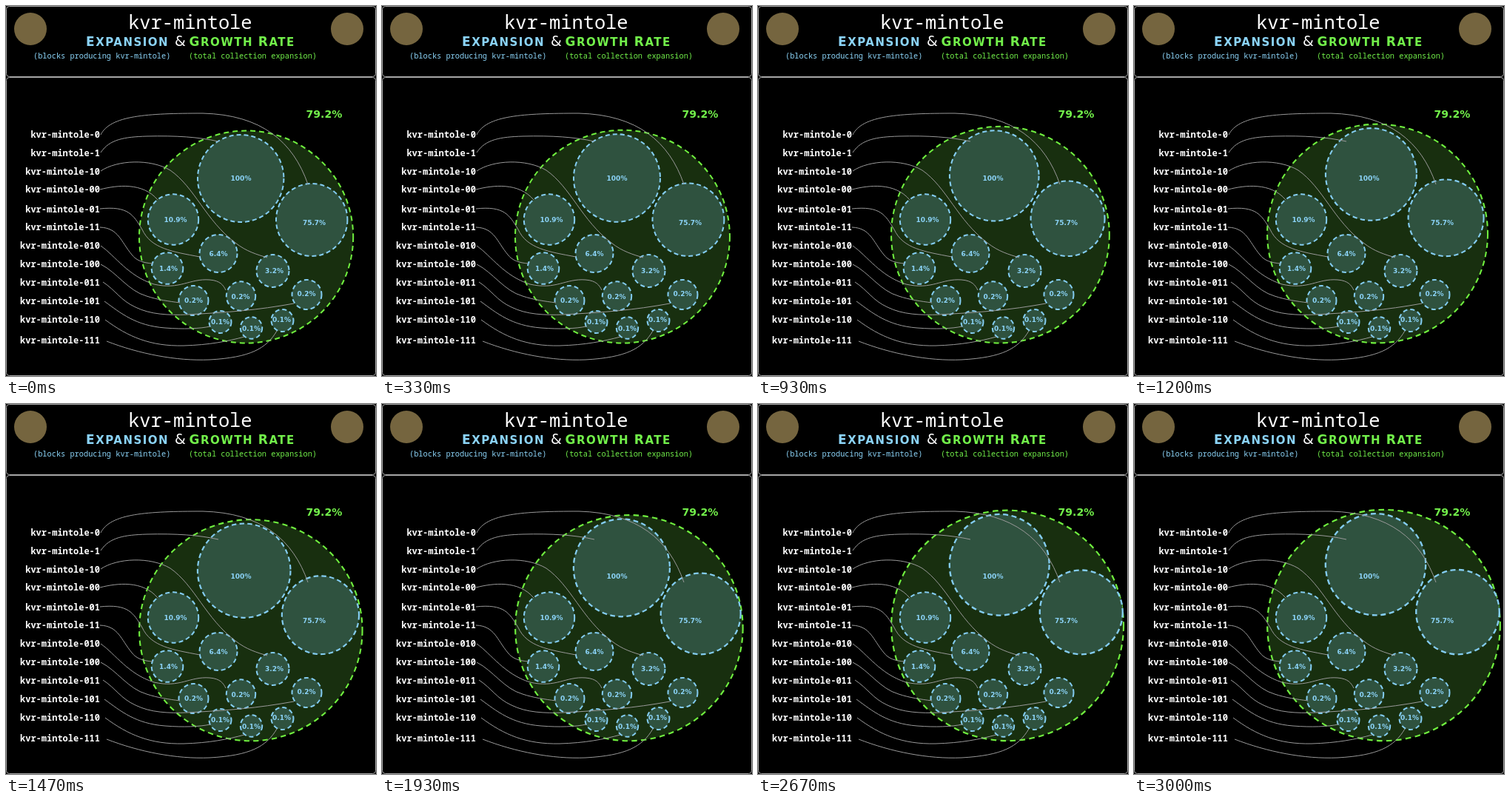
These frames come from a looping animation (500 by 500 pixels, 4.73 s). An HTML page:

```html
<!DOCTYPE html>
<html lang="en">
<head>
<meta charset="utf-8">
<title>Expansion &amp; Growth Rate</title>
<style>
  html, body { margin: 0; width: 100%; height: 100%; overflow: hidden; background: #000; }
  svg { display: block; width: 100%; height: 100%; }
  text { font-family: "Noto Sans Mono", monospace; fill: #fff; white-space: pre; }
  .panel { fill: #000; stroke: #a6a6a6; }
  .title { font-size: 25.4px; }
  .heading { font: 700 15px "DejaVu Sans", sans-serif; letter-spacing: 1.5px; }
  .heading .cap { font-size: 17px; }
  .ampersand { font: 19px "DejaVu Sans", sans-serif; }
  .note { font-size: 10.3px; }
  .label { font-size: 12px; font-weight: 600; text-anchor: end; }
  .percent { font: 700 9px "DejaVu Sans", sans-serif; text-anchor: middle; }
  .total { font: 700 14.1px "DejaVu Sans", sans-serif; }
  text.blue { fill: #8bd3f7; }
  text.green { fill: #72f04a; }
  .whole { fill: #182f0f; stroke: #70f03f; stroke-width: 2; stroke-dasharray: 7 5; }
  .bubble { fill: #2f523f; stroke: #84cdf2; stroke-width: 2; stroke-dasharray: 6 4; }
  .link { fill: none; stroke: #999; }
</style>
</head>
<body>
<svg id="stage" viewBox="0 0 500 500">
  <rect class="panel" x=".5" y=".5" width="499" height="95" rx="4"/>
  <rect class="panel" x=".5" y="96.5" width="499" height="403" rx="4"/>
  <circle cx="33" cy="31" r="22" fill="#75653f"/>
  <circle cx="461" cy="31" r="22" fill="#75653f"/>
  <text class="title" x="165" y="31">kvr-mintole</text>
  <text class="heading blue" x="108" y="54"><tspan class="cap">E</tspan>XPANSION</text>
  <text class="ampersand" x="228" y="54">&amp;</text>
  <text class="heading green" x="247.5" y="54"><tspan class="cap">G</tspan>ROWTH <tspan class="cap">R</tspan>ATE</text>
  <text class="note blue" x="37" y="71">(blocks producing kvr-mintole)</text>
  <text class="note green" x="247" y="71">(total collection expansion)</text>
  <text class="total green" x="405.5" y="150.5">79.2%</text>
</svg>
<script>
const LOOP = 4730, STEPS = 45, STEP_MS = 200 / 3;
const stage = document.getElementById('stage');

function add(tag, attributes, text = '') {
  const node = document.createElementNS('http://www.w3.org/2000/svg', tag);
  for (const [key, value] of Object.entries(attributes)) node.setAttribute(key, value);
  node.textContent = text;
  return stage.appendChild(node);
}

// Each growing shape: radii, start centre, end centre, final scale.
const growing = [
  { class: 'whole', rx: 144.6, ry: 143.5, from: [324.6, 312], to: [337.5, 299], scale: 1.088 },
  { class: 'bubble', rx: 58.2, ry: 59, from: [317.2, 233], to: [326.5, 216.8], scale: 1.163 },
  { class: 'bubble', rx: 48.2, ry: 49, from: [413.2, 289], to: [437.5, 281.2], scale: 1.167 }
].map(shape => ({
  ...shape,
  node: add('ellipse', { class: shape.class, rx: shape.rx, ry: shape.ry })
}));

// Fixed bubbles: centre x, centre y, radius.
[
  [226, 288.5, 34.2], [287, 334.5, 25.5], [218, 354.5, 21.3], [360.5, 358, 22],
  [253.5, 398, 20], [317.5, 392, 19.7], [406.5, 390, 20],
  [289.5, 427, 15], [331.5, 435, 14.7], [373.5, 425, 15]
].forEach(([cx, cy, r]) => add('circle', { class: 'bubble', cx, cy, r }));

// Label suffix, baseline, and the line leading to its bubble.
[
  ['0', 178, 'M128 174C141 148 190 145 266 145C345 147 388 183 408 241'],
  ['1', 203, 'M128 198C140 180 160 177 190 176C230 175 260 177 287 183'],
  ['10', 228, 'M128 223C150 208 195 206 222 222C255 245 270 290 310 320C325 332 340 336 353 340'],
  ['00', 252, 'M127 248C150 242 185 238 205 262'],
  ['01', 279, 'M127 274C165 270 172 282 184 302C196 328 225 332 262 339'],
  ['11', 303, 'M127 299C152 300 155 318 170 336C176 344 185 347 198 348'],
  ['010', 328, 'M128 324C148 338 165 365 200 376C235 384 248 368 275 370C290 371 294 378 297 384'],
  ['100', 353, 'M128 349C150 360 165 385 190 392C205 397 220 399 235 401'],
  ['011', 378, 'M131 373C148 384 155 398 175 407C195 417 220 418 245 417C300 414 340 411 389 402'],
  ['101', 403, 'M133 399C155 415 175 432 215 435C240 437 262 436 276 433'],
  ['110', 428, 'M134 424C165 447 195 460 240 459C275 458 300 453 322 447'],
  ['111', 456, 'M136 453C180 470 230 480 275 478C330 475 352 463 366 439']
].forEach(([suffix, y, d]) => {
  add('text', { class: 'label', x: 127, y }, 'kvr-mintole-' + suffix);
  add('path', { class: 'link', d });
});

[
  ['100%', 317.5, 235.5], ['75.7%', 416.5, 295.5], ['10.9%', 229, 291.5],
  ['6.4%', 287, 337.5], ['1.4%', 219.5, 357.5], ['3.2%', 362.5, 360.5],
  ['0.2%', 253.5, 400.5], ['0.2%', 317, 396], ['0.2%', 406, 392],
  ['0.1%', 289.5, 430], ['0.1%', 331.5, 438.5], ['0.1%', 372.5, 427]
].forEach(([value, x, y]) => add('text', { class: 'percent blue', x, y }, value));

function draw(time) {
  // Fifteen steps a second, each starting on a whole hundredth.
  const hundredths = Math.floor((time % LOOP) / 10);
  const step = Math.min(STEPS, Math.floor((hundredths * 10 + 3.4) / STEP_MS));
  const progress = (1 - Math.cos(Math.PI * step / STEPS)) / 2;
  const mix = (a, b) => a + (b - a) * progress;
  for (const { node, from, to, scale } of growing) {
    const x = mix(from[0], to[0]), y = mix(from[1], to[1]);
    node.setAttribute('transform', `translate(${x} ${y}) scale(${mix(1, scale)})`);
  }
}

const start = performance.now();
function tick() {
  draw(performance.now() - start);
  requestAnimationFrame(tick);
}
tick();
</script>
</body>
</html>
```
